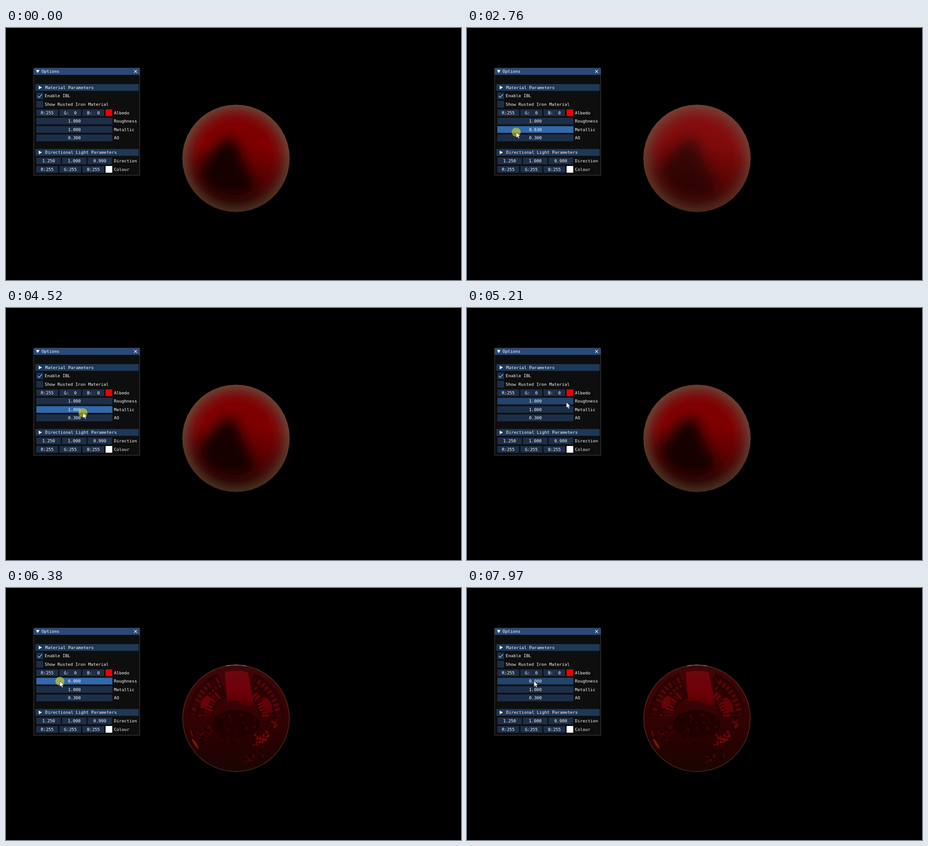
An HTML page that plays this animation: 1005 by 557 pixels, repeating every 8 s.

```html
<!DOCTYPE html>
<html lang="en">
<head>
<meta charset="utf-8">
<title>Material options</title>
<style>
  html, body { margin: 0; width: 100%; height: 100%; overflow: hidden; background: #000; }
  svg { display: block; width: 1005px; height: 557px; }
  text { font: 9.4px "DejaVu Sans Mono", "Noto Sans Mono", monospace; fill: #fff; white-space: pre; }
  .mid { text-anchor: middle; }
  .frame { fill: #1d2e48; }
  .frame.hover { fill: #23446c; }
  .frame.active { fill: #3169ac; }
  .head { fill: #1e3857; }
</style>
</head>
<body>
<svg id="stage" viewBox="0 0 1005 557">
  <defs>
    <clipPath id="ball"><polygon id="outline"/></clipPath>
    <radialGradient id="roughBase" gradientUnits="userSpaceOnUse" cx="508" cy="288" r="118.5">
      <stop offset="0" stop-color="#760000"/><stop offset=".69" stop-color="#800000"/>
      <stop offset=".71" stop-color="#7c0606"/><stop offset=".88" stop-color="#781818"/>
      <stop offset="1" stop-color="#703830"/>
    </radialGradient>
    <linearGradient id="floor" gradientUnits="userSpaceOnUse" x1="500" y1="260" x2="490" y2="400">
      <stop offset="0" stop-color="#180500" stop-opacity="0"/>
      <stop offset=".55" stop-color="#180500" stop-opacity=".45"/>
      <stop offset="1" stop-color="#180a02" stop-opacity=".8"/>
    </linearGradient>
    <linearGradient id="plain" gradientUnits="userSpaceOnUse" x1="545" y1="170" x2="480" y2="405">
      <stop offset="0" stop-color="#962829"/><stop offset=".3" stop-color="#871f1f"/>
      <stop offset=".55" stop-color="#6c100e"/><stop offset=".8" stop-color="#520906"/>
      <stop offset="1" stop-color="#480b06"/>
    </linearGradient>
    <radialGradient id="plainRim" gradientUnits="userSpaceOnUse" cx="516" cy="296" r="128">
      <stop offset=".55" stop-color="#804038" stop-opacity="0"/>
      <stop offset="1" stop-color="#805044" stop-opacity=".6"/>
    </radialGradient>
    <radialGradient id="rim" gradientUnits="userSpaceOnUse" cx="508" cy="288" r="118.5">
      <stop offset=".8" stop-color="#604830" stop-opacity="0"/>
      <stop offset="1" stop-color="#604830" stop-opacity=".5"/>
    </radialGradient>
    <linearGradient id="midBase" x1="0" y1="0" x2="0" y2="1">
      <stop offset="0" stop-color="#70181a"/><stop offset=".15" stop-color="#680404"/>
      <stop offset=".45" stop-color="#4c0000"/><stop offset=".75" stop-color="#380000"/>
      <stop offset="1" stop-color="#1c0a04"/>
    </linearGradient>
    <linearGradient id="mirrorBase" x1="0" y1="0" x2="0" y2="1">
      <stop offset="0" stop-color="#400608"/><stop offset=".4" stop-color="#380203"/>
      <stop offset=".7" stop-color="#280101"/><stop offset="1" stop-color="#1a0502"/>
    </linearGradient>
    <linearGradient id="sky" x1="0" y1="0" x2="0" y2="1">
      <stop offset="0" stop-color="#6a0810"/><stop offset=".6" stop-color="#700008"/>
      <stop offset="1" stop-color="#500003"/>
    </linearGradient>
    <radialGradient id="spot">
      <stop offset="0" stop-color="#cc5052"/><stop offset=".35" stop-color="#b84044" stop-opacity=".85"/>
      <stop offset="1" stop-color="#a02020" stop-opacity="0"/>
    </radialGradient>
    <filter id="soft" x="-50%" y="-50%" width="200%" height="200%"><feGaussianBlur stdDeviation="13"/></filter>
    <filter id="softer" x="-50%" y="-50%" width="200%" height="200%"><feGaussianBlur stdDeviation="6"/></filter>
    <filter id="focus" x="-10%" y="-10%" width="120%" height="120%"><feGaussianBlur id="blur" stdDeviation=".6"/></filter>
  </defs>
  <rect width="1005" height="557"/>
  <g clip-path="url(#ball)">
    <g id="rough">
      <rect x="388" y="168" width="240" height="240" fill="url(#roughBase)"/>
      <rect x="388" y="168" width="240" height="240" fill="url(#floor)"/>
      <path d="M472 255Q490 236 510 254Q524 310 552 345Q540 378 490 372Q446 366 424 318Q440 290 472 255Z" fill="#180000" filter="url(#soft)"/>
      <circle cx="508" cy="288" r="83" fill="none" stroke="#a00" stroke-opacity=".18"/>
      <rect x="388" y="168" width="240" height="240" fill="url(#rim)"/>
    </g>
    <g id="mid">
      <rect x="388" y="168" width="240" height="240" fill="url(#midBase)"/>
      <g id="blots" filter="url(#softer)"></g>
      <circle cx="508" cy="288" r="83" fill="none" stroke="#900" stroke-opacity=".15"/>
      <rect x="388" y="168" width="240" height="240" fill="url(#rim)"/>
    </g>
    <g id="mirror">
      <rect x="388" y="168" width="240" height="240" fill="url(#mirrorBase)"/>
      <g id="scene" filter="url(#focus)"></g>
      <circle cx="508" cy="288" r="117.5" fill="none" stroke="#50452c" stroke-opacity=".55" stroke-width="1.6"/>
      <path d="M486 172Q508 167 531 172" fill="none" stroke="#999" stroke-width="1.8"/>
    </g>
    <ellipse id="glint" fill="url(#spot)" transform="translate(591 217) rotate(-42)"/>
    <g id="dielectric">
      <rect x="388" y="168" width="240" height="240" fill="url(#plain)"/>
      <rect x="388" y="168" width="240" height="240" fill="url(#plainRim)"/>
    </g>
  </g>
  <g id="panel"></g>
  <circle id="press" r="10" fill="#ffee00" fill-opacity=".52"/>
  <path id="pointer" d="M0 0V12.2L2.9 9.6L4.9 14L7 13.1L5.1 8.8H9Z" fill="#fff" stroke="#000" stroke-width=".5"/>
</svg>
<script>
const LOOP = 8000, CX = 508, CY = 288, R = 118.5;
const $ = id => document.getElementById(id);
const clamp = v => Math.max(0, Math.min(1, v));

function add(parent, tag, attrs, label) {
  const el = document.createElementNS("http://www.w3.org/2000/svg", tag);
  for (const key in attrs) el.setAttribute(key, attrs[key]);
  if (label !== undefined) el.textContent = label;
  return parent.appendChild(el);
}

const polar = (deg, r) => {
  const a = deg * Math.PI / 180;
  return (CX + r * Math.cos(a)).toFixed(1) + " " + (CY + r * Math.sin(a)).toFixed(1);
};

let seed = 11;
const rand = () => (seed = (seed * 16807) % 2147483647) / 2147483647;

// Sphere: faceted outline, soft and sharp reflections
$("outline").setAttribute("points", Array.from({ length: 44 }, (_, i) => polar(i * 360 / 44, R)).join(" "));

function blot(x, y, rx, ry, turn, fill, parent = $("blots")) {
  add(parent, "ellipse", { rx, ry, fill, transform: `translate(${x} ${y}) rotate(${turn})` });
}
blot(488, 318, 42, 34, 0, "#1c0000");
blot(488, 248, 18, 14, 0, "#380000");
blot(505, 215, 38, 20, 0, "#820000");
blot(440, 258, 15, 20, 25, "#860000");
blot(530, 240, 14, 22, -15, "#800000");
blot(572, 268, 14, 22, -10, "#860000");
blot(563, 335, 9, 19, 32, "#8a0000");
blot(418, 338, 5, 18, -28, "#741008");
blot(432, 328, 10, 8, 0, "#600000");
blot(525, 180, 24, 6, 5, "#43191a");
blot(500, 372, 60, 12, 0, "#240200");
blot(607, 300, 7, 22, 0, "#5c1410");

const scene = $("scene");
function sector(a0, a1, r0, r1, fill) {
  const d = `M${polar(a0, r0)}L${polar(a0, r1)}A${r1} ${r1} 0 0 1 ${polar(a1, r1)}L${polar(a1, r0)}A${r0} ${r0} 0 0 0 ${polar(a0, r0)}Z`;
  add(scene, "path", { d, fill });
}
function facade(side) {
  const span = (a, w, r0, r1, fill) => {
    const b = 270 + side * a;
    sector(Math.min(b, b + side * w), Math.max(b, b + side * w), r0, r1, fill);
  };
  span(22, 66, 50, 108, "#2a0203");
  for (let a = 24; a < 84; a += 6.5) {
    span(a, 3.8, 86 + 4 * rand(), 100, rand() < .7 ? "#520508" : "#390203");
    span(a + 1, 3.4, 76, 83, rand() < .6 ? "#580408" : "#330203");
    if (a > 34) span(a, 4.6, 54 + 5 * rand(), 73, rand() < .7 ? "#660206" : "#450204");
  }
}
facade(-1);
facade(1);
add(scene, "path", { d: "M483 186Q508 180 534 186L548 256Q530 266 514 250Q500 246 489 252Z", fill: "url(#sky)" });
blot(440, 252, 9, 14, 30, "#680306", scene);
blot(577, 258, 9, 17, -25, "#600305", scene);
blot(508, 300, 52, 30, 0, "#200001", scene);

function scatter(n, x, y, w, h, size, fills) {
  for (let i = 0; i < n; i++) {
    const dx = rand() + rand() - 1, dy = rand() + rand() - 1;
    blot(x + dx * w - dy * w * .5, y + dy * h, size * (.4 + rand()), size * (.3 + rand() * .7),
      rand() * 180, fills[i % fills.length], scene);
  }
}
scatter(34, 563, 335, 16, 24, 3.4, ["#780606", "#640404", "#2a0101"]);
scatter(22, 594, 296, 8, 18, 3, ["#600808", "#200101"]);
scatter(26, 436, 322, 22, 18, 3.2, ["#480303", "#1a0000"]);
scatter(40, 500, 305, 60, 40, 4, ["#380202", "#180000", "#2c0101"]);
scatter(18, 540, 378, 24, 14, 4, ["#160201", "#3c0604"]);
blot(418, 344, 2.6, 13, -32, "#7a160e", scene);
blot(410, 322, 1.6, 8, -18, "#581008", scene);

// Options window
const panel = $("panel");
const rows = {};
const box = (x, y, w, h, attrs) => add(panel, "rect", { x, y, width: w, height: h, ...attrs });
const label = (x, y, text, mid) => add(panel, "text", mid ? { x, y: y + 3.4, class: "mid" } : { x, y: y + 3.4 }, text);
const shape = (d, attrs) => add(panel, "path", { d, ...attrs });

function header(y, text) {
  box(65, y - 7.5, 228, 15, { class: "head" });
  shape(`M72.3 ${y - 4}L79.3 ${y}L72.3 ${y + 4}Z`, { fill: "#fff" });
  label(86.5, y, text);
}
function check(y, text) {
  box(67, y - 7.5, 15, 15, { class: "frame" });
  label(85.5, y, text);
}
function slider(name, y, text, value) {
  const rect = box(67, y - 7.3, 168, 14.8, { class: "frame" });
  rows[name] = { rect, top: y - 7.3, bottom: y + 7.5, value: label(151, y, value, true) };
  label(238.5, y, text);
}
function fields(y, cells, w, step, text, swatch) {
  cells.forEach((cell, i) => {
    box(67 + i * step, y - 7.3, w, 14.8, { class: "frame" });
    label(67 + i * step + w / 2, y, cell, true);
  });
  if (swatch) box(220, y - 7.3, 14.6, 14.8, { fill: swatch });
  label(238.5, y, text);
}

box(61, 88.5, 234.5, 237, { fill: "#0e0e0e" });
box(61, 88.5, 234.5, 15, { fill: "#294a7a" });
box(61, 88.5, 234.5, 237, { fill: "none", stroke: "#42424a" });
shape("M66 92.8H74L70 99.6Z", { fill: "#fff" });
label(78.5, 96, "Options");
shape("M283 92.8L289.4 99.2M289.4 92.8L283 99.2", { stroke: "#fff", "stroke-width": 1.1 });
header(131.5, "Material Parameters");
check(150, "Enable IBL");
shape("M70 150.3L73.3 153.6L79.3 146.6", { fill: "none", stroke: "#6aa6ee", "stroke-width": 1.8 });
check(168.5, "Show Rusted Iron Material");
fields(187.2, ["R:255", "G:  0", "B:  0"], 48, 51, "Albedo", "#ee0000");
slider("roughness", 205.7, "Roughness", "1.000");
slider("metallic", 224.2, "Metallic", "1.000");
slider("ao", 242.8, "AO", "0.300");
header(275, "Directional Light Parameters");
fields(293.7, ["1.250", "1.000", "0.900"], 54, 56.6, "Direction");
fields(312.3, ["R:255", "G:255", "B:255"], 48, 51, "Colour", "#fff");

// Each move: start, end, steps, then points of x, y, roughness, metallic
const moves = [
  [70, 690, 10, [872, 547, 1, 1], [110, 232.5, 1, 1]],
  [890, 1230, 5, [110, 232.5, 1, 1], [126, 226, 1, 1]],
  [1510, 1930, 7, [126, 226, 1, 1], [157, 231, 1, 1]],
  [2130, 2900, 12, [157, 231, 1, 1], [99, 230, 1, .55]],
  [2970, 3530, 9, [99, 230, 1, .55], [37, 230.5, 1, .06]],
  [3750, 4520, 12, [37, 230.5, 1, .06], [131, 231, 1, 1], [170, 231.5, 1, 1]],
  [4590, 5280, 10, [170, 231.5, 1, 1], [225, 206, 1, 1]],
  [5430, 5480, 2, [225, 206, 1, 1], [225, 205.5, 1, 1]],
  [5630, 6380, 12, [225, 205.5, 1, 1], [164.5, 205.5, .5, 1], [119, 206, 0, 1]],
  [6450, 7220, 12, [119, 206, 0, 1], [140, 220, 0, 1], [155, 233, 0, 1], [155, 235, 0, 1]],
  [7290, 7970, 9, [155, 235, 0, 1], [148, 206, 0, 1]]
];
const presses = [[1160, 4590, "metallic"], [5430, 6450, "roughness"]];

function pose(t) {
  const move = moves.filter(m => m[0] <= t).pop();
  if (!move) return null;
  const [start, end, steps, ...pts] = move;
  const step = Math.floor((t - start + 1) / ((end - start) / (steps - 1)));
  const at = Math.min(1, (step + 1) / steps) * (pts.length - 1);
  const i = Math.min(pts.length - 2, Math.floor(at));
  return pts[i].map((v, k) => v + (pts[i + 1][k] - v) * (at - i));
}

function paintBall(rough, metal) {
  $("mid").style.opacity = clamp((1 - rough) * 2);
  $("mirror").style.opacity = clamp((.45 - rough) / .3);
  $("blur").setAttribute("stdDeviation", .6 + rough * 14);
  const size = 84 * rough;
  $("glint").setAttribute("rx", size * .72);
  $("glint").setAttribute("ry", size * 1.15);
  $("glint").style.opacity = clamp((1 - rough) * 2);
  $("dielectric").style.opacity = 1 - metal;
}

function draw(t) {
  const now = pose(t);
  const [x, y, rough, metal] = now || [0, 0, 1, 1];
  const press = presses.find(p => t >= p[0] && t < p[1]);
  const place = `translate(${x} ${y})`;
  $("pointer").setAttribute("transform", place);
  $("press").setAttribute("transform", place);
  $("pointer").style.display = now ? "" : "none";
  $("press").style.display = press ? "" : "none";
  for (const name in rows) {
    const row = rows[name];
    const over = !press && now && x >= 67 && x <= 235 && y >= row.top && y <= row.bottom;
    const state = press && press[2] === name ? " active" : over ? " hover" : "";
    row.rect.setAttribute("class", "frame" + state);
  }
  rows.roughness.value.textContent = rough.toFixed(2) + "0";
  rows.metallic.value.textContent = metal.toFixed(2) + "0";
  paintBall(rough, metal);
}

const began = performance.now();
function tick() {
  draw((performance.now() - began) % LOOP);
  requestAnimationFrame(tick);
}
tick();
</script>
</body>
</html>
```
